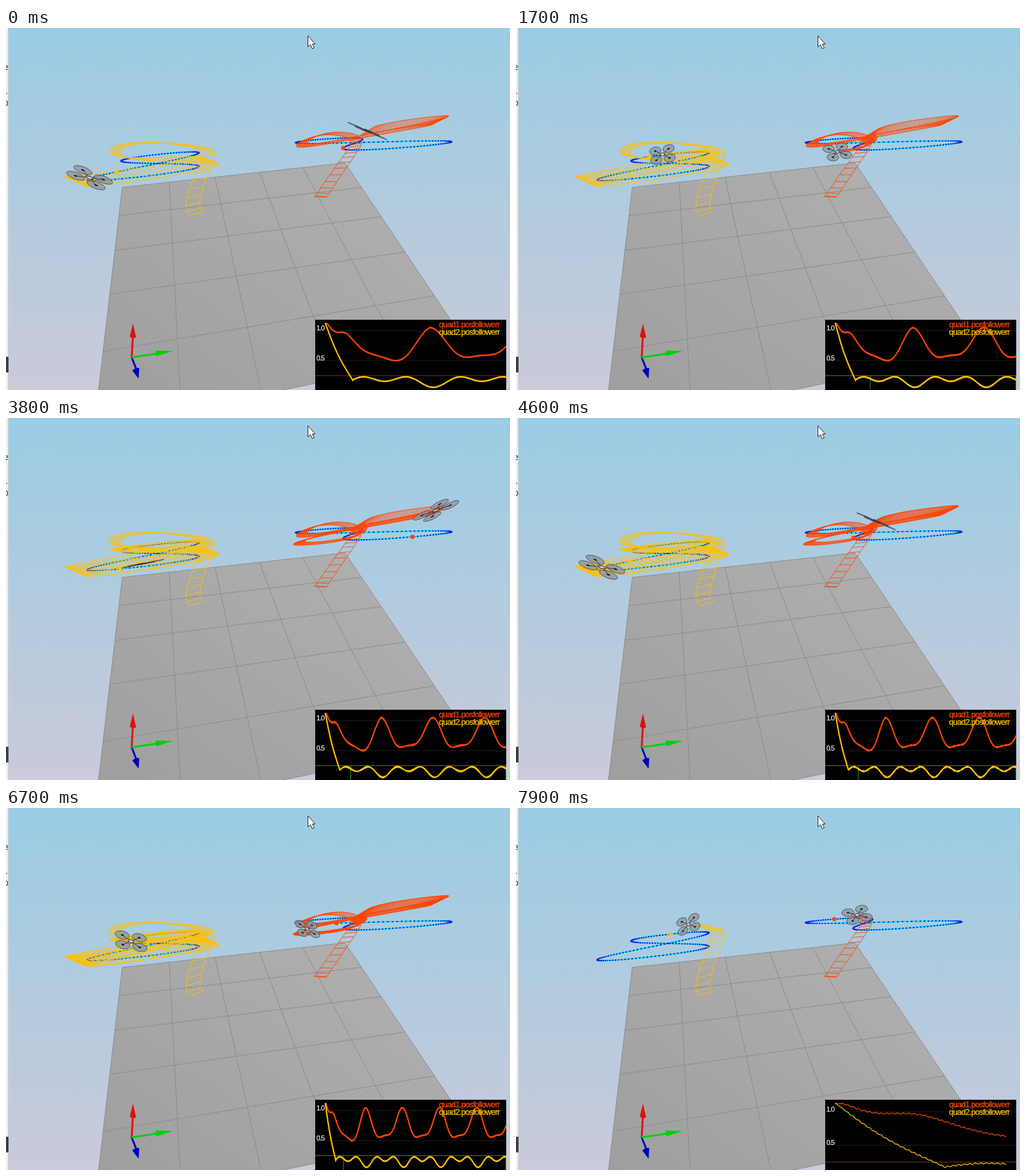
Write an HTML page that moves like this. It is 802x577 px and loops after 8000 ms.

```html
<!DOCTYPE html>
<html lang="en">
<head>
<meta charset="utf-8">
<title>Quadcopter path following</title>
<style>
  html, body { margin: 0; width: 100%; height: 100%; overflow: hidden; }
  svg { display: block; }
  text { font-family: "Liberation Sans", Arial, sans-serif; }
  .trail { fill: none; stroke-width: .9; }
  .disc { fill: #8f97a3; fill-opacity: .8; stroke: #3c4046; stroke-width: .8; }
  .arm { fill: none; stroke: #33353d; stroke-width: 1; }
  .drone * { vector-effect: non-scaling-stroke; }
  .legend { font-size: 13px; letter-spacing: -.75px; stroke-width: .3; }
  .label { font-size: 11px; letter-spacing: -1px; fill: #fff; stroke: #fff; stroke-width: .2; }
</style>
</head>
<body>
<svg id="stage" width="802" height="577" viewBox="0 0 802 577">
  <defs>
    <linearGradient id="sky" x2="0" y2="1">
      <stop stop-color="#9acce3"/><stop offset="1" stop-color="#cacada"/>
    </linearGradient>
    <linearGradient id="ground" x1="1" y1="0" x2="0" y2="1">
      <stop stop-color="#b2b2b2"/><stop offset="1" stop-color="#9d9d9d"/>
    </linearGradient>
    <clipPath id="plotArea"><rect x="492" y="465" width="304" height="112"/></clipPath>
  </defs>
  <rect width="802" height="577" fill="url(#sky)"/>
  <rect width="4" height="577" fill="#f1efed"/>
  <rect x="3" width="1" height="577" fill="#d5d3d1"/>
  <g font-size="14" fill="#333"><text x="-4" y="67">e</text><text x="-1" y="105">.</text><text x="-4" y="124">p</text></g>
  <rect y="524" width="4" height="25" fill="#3f3d44"/>
  <g id="floor" stroke="#8b8b8b" fill="none"></g>
  <g stroke-width="3">
    <path d="M200 525L202 490" stroke="#e01010"/><path d="M202 471L207 493Q202 496 197 492Z" fill="#e01010"/>
    <path d="M200 525L209 548" stroke="#0000c0"/><path d="M211 559L201 546Q206 541 212 542Z" fill="#0000c0"/>
    <path d="M200 525L240 519" stroke="#00d010"/><path d="M265 515L239 514Q236 519 240 523Z" fill="#00d010"/>
  </g>
  <g id="scene"></g>
  <rect x="492" y="465" width="304" height="112" fill="#000"/>
  <g clip-path="url(#plotArea)">
    <path id="grid" stroke="#1d1d1d" fill="none"/>
    <path id="limit" fill="none"/>
    <path id="settled" stroke="#10a818" fill="none"/>
    <path id="plot0" fill="none" stroke="#ff4500"/>
    <path id="plot1" fill="none" stroke="#ffc400"/>
    <text id="one" class="label" x="494">1.0</text>
    <text id="half" class="label" x="494">0.5</text>
    <text class="legend" x="689" y="477" fill="#ff4500" stroke="#ff4500">quad1.posfollowerr</text>
    <text class="legend" x="689" y="489" fill="#ffc400" stroke="#ffc400">quad2.posfollowerr</text>
  </g>
  <path d="M480.500 12.500V30L484.500 26.500L487.500 33L490.500 31.500L487.500 25.500H492Z" fill="#fff" stroke="#222"/>
</svg>
<script>
const $ = id => document.getElementById(id);
const set = (el, attrs) => { for (const k in attrs) el.setAttribute(k, attrs[k]); return el; };
const add = (parent, tag, attrs) =>
  parent.appendChild(set(document.createElementNS("http://www.w3.org/2000/svg", tag), attrs));
const line = pts => "M" + pts.map(p => p[0].toFixed(1) + " " + p[1].toFixed(1)).join("L");
const mix = (a, b, u) => a + (b - a) * u;
const bell = x => Math.exp(-x * x);

// Once-per-lap swing plus a twice-per-lap swing; p1 and p2 are the laps at which they peak
const wave = (mean, a1, p1, a2 = 0, p2 = 0) => s =>
  mean + a1 * Math.cos(2 * Math.PI * (s - p1)) + a2 * Math.cos(4 * Math.PI * (s - p2));

// Eased cycle through a few poses [lap, values...]
const cycle = poses => s => {
  const u = s - Math.floor(s);
  const loop = [...poses, ...poses.map(([t, ...v]) => [t + 1, ...v])];
  const at = u < poses[0][0] ? u + 1 : u;
  const i = loop.findIndex(p => p[0] > at);
  const [t0, ...a] = loop[i - 1], [t1, ...b] = loop[i];
  const k = (1 - Math.cos(Math.PI * (at - t0) / (t1 - t0))) / 2;
  return a.map((v, n) => mix(v, b[n], k));
};

// goal: reference loop; x, y: settled flight loop; dx, dy: launch from the ground;
// half: half the trail's width vector, span: its value at launch; arms: projected arm vectors
const quads = [{
  color: "#ff4500",
  goal: [wave(572, 82, .695, 63, .115), wave(183.6, 5.8, .795, -5.5, .115)],
  x: wave(573, 83, .78, 47, .175),
  y: wave(174, 25, .28, 5, .91),
  dx: s => -61 * bell(s / .1) + 10 * bell((s - .28) / .12),
  dy: s => 98 * bell(s / .09) - 30 * bell((s - .28) / .12),
  half: [wave(11, 3, .75), wave(-5.2, 2.7, .34)],
  span: [9.5, .5],
  arms: cycle([[.16, 15, 3, 7, -10], [.41, 11.5, 8, 7.5, -6], [.745, 22.5, -8, 6, -10], [.93, 19, 8.5, 7, 1.8]]),
  error: t => wave(.743, .235, .065, .073, .085)(t) + (t < 1.075 ? .12 * Math.cos(6 * (t - .29)) : 0)
    + .15 * bell(t / .05) - .12 * bell((t - .12) / .08)
}, {
  color: "#ffc000",
  goal: [wave(231, 27, .34, 75, .09), wave(219, 18.6, .74, -8, .09)],
  x: wave(230, 32, .4, 88, .122),
  y: wave(217, 18, .81, -11, .125),
  dx: s => 96 * Math.exp(-s / .052),
  dy: s => 72 * bell(s / .075) - 21 * bell((s - .3) / .11),
  half: [wave(13, 4, .82), wave(4.5, 3.5, .8)],
  span: [11, -3],
  arms: cycle([[.16, 8, -11.5, 10, 3], [.41, 13, -5.5, 14, 10], [.745, 22, -4.5, 8, -1], [.93, 22, 3, 10.5, 12]]),
  error: t => wave(.165, -.05, .11, -.06, .11)(t) + Math.max(0, 1.015 - 3.6 * t)
}];

const goalAt = (q, s) => q.goal.map(f => f(s));
const centre = (q, s) => [q.x(s) + q.dx(s), q.y(s) + q.dy(s)];
function edges(q, s) {
  const [x, y] = centre(q, s);
  const [hx, hy] = q.half.map((f, i) => mix(f(s), q.span[i], bell(s / .2)));
  return [[x - hx, y - hy], [x + hx, y + hy]];
}

// Floor: five cells each way; depth is the perspective ratio along an edge
const along = (a, b, depth, v) => {
  const u = v * depth / (1 - v + v * depth);
  return [mix(a[0], b[0], u), mix(a[1], b[1], u)];
};
const [backLeft, backRight, frontLeft, frontRight] = [[185, 254], [539.5, 215], [140, 639], [741, 515]];
add($("floor"), "path", { d: line([backLeft, backRight, frontRight, frontLeft]) + "Z", fill: "url(#ground)" });
for (let v = .2; v < .9; v += .2) {
  add($("floor"), "path", { d: line([along(backLeft, frontLeft, .53, v), along(backRight, frontRight, .6, v)]) });
  add($("floor"), "path", { d: line([along(backLeft, backRight, 1.07, v), along(frontLeft, frontRight, 1.2, v)]) });
}

const goals = add($("scene"), "g", {});
for (const q of quads) {
  const pts = Array.from({ length: 171 }, (_, i) => goalAt(q, i / 170));
  add(goals, "path", { d: line(pts), fill: "none", stroke: "#00dcf5", "stroke-width": 2 });
  add(goals, "path", {
    d: pts.map(p => line([p]) + "h.01").join(""),
    stroke: "#0a1fe0", "stroke-width": 2.4, "stroke-linecap": "round"
  });
}
for (const q of quads) {
  q.trail = add($("scene"), "path", { class: "trail", stroke: q.color });
  q.drone = add($("scene"), "g", { class: "drone" });
  const ends = [[-1, 0], [0, -1], [1, 0], [0, 1]];
  for (const [cx, cy] of ends) add(q.drone, "circle", { class: "disc", cx, cy, r: .6 });
  add(q.drone, "path", { class: "arm", d: "M-1 0H1M0-1V1" });
  for (const [cx, cy] of ends) add(q.drone, "circle", { cx, cy, r: .12, fill: "#15161c" });
  add(q.drone, "rect", { x: -.2, y: -.2, width: .4, height: .4, fill: "#c9cedb", stroke: "#23263c" });
  q.marker = add($("scene"), "circle", { r: 3.4, fill: q.color });
}

// Laps flown at clock time t: the view freezes once, later the flight restarts
const RESTART = 6900;
function lapsAt(t) {
  if (t >= RESTART) return .22 * (t - RESTART) / 1000;
  return t < 2900 ? .93 + .196 * Math.min(t, 2400) / 1000 : 1.53 + .238 * (t - 2900) / 1000;
}

function drawQuad(q, s) {
  const a = [], b = [];
  let rungs = "";
  const sample = u => {
    const pair = edges(q, u);
    a.push(pair[0]);
    b.push(pair[1]);
    rungs += line(pair);
  };
  for (let u = 0; u < s; u += .0085 + .005 * bell(u / .12)) sample(u);
  sample(s);
  set(q.trail, { d: line(a) + line(b) + rungs });
  set(q.drone, { transform: `matrix(${[...q.arms(s), ...centre(q, s)]})` });
  const [cx, cy] = goalAt(q, s);
  set(q.marker, { cx, cy });
}

// The error repeats twice per lap
function drawPlot(s) {
  const end = 2 * s, width = end < .6 ? 272 : 288, count = 500;
  const ripple = end < 1 ? .008 : .004;
  const series = quads.map(q => Array.from({ length: count + 1 }, (_, i) => {
    const t = end * i / count;
    return q.error(t) + ripple * Math.sin(t * 440) * Math.min(1, t * 20);
  }));
  const low = Math.min(1, ...series[1]);
  const y = v => 470 + 103 * (1.13 - v) / (1.13 - low);
  series.forEach((values, k) => set($("plot" + k), {
    d: line(values.map((v, i) => [508 + width * i / count, y(v)])),
    "stroke-width": Math.min(2.2, 1 + .6 * end)
  }));
  set($("grid"), { d: `M508 ${y(1)}H796M508 ${y(.5)}H796` });
  set($("one"), { y: y(1) });
  set($("half"), { y: y(.5) });
  const settled = s > 1.1;
  set($("limit"), { d: `M492 ${y(.25)}H796`, stroke: settled ? "#75783c" : "#7a3a1c" });
  set($("settled"), { d: settled ? `M${508 + width * .49 / end} ${y(.25)}V577M795.5 ${y(.25)}V577` : "" });
}

let shown = -1;
function tick(now) {
  const t = Math.floor(now % 8000 / 100) * 100;
  if (t !== shown) {
    shown = t;
    const s = lapsAt(t);
    quads.forEach(q => drawQuad(q, s));
    drawPlot(s);
    set(goals, { visibility: t >= RESTART && t < 7400 ? "hidden" : "visible" });
  }
  requestAnimationFrame(tick);
}
tick(0);
</script>
</body>
</html>
```
